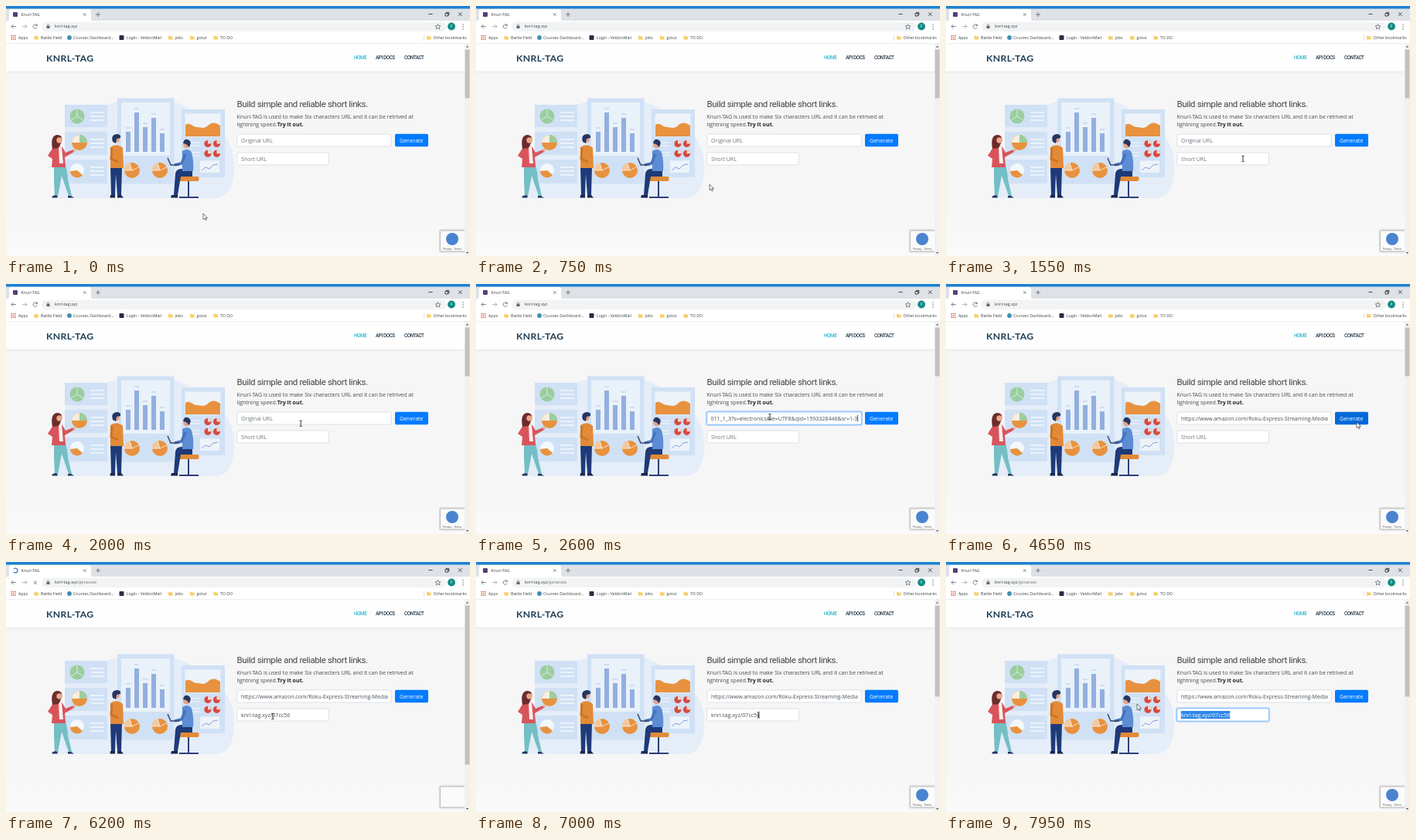
Animation, 600 px wide and 324 px high, one loop 8000 ms. Source, as an HTML page:

```html
<!DOCTYPE html>
<html lang="en">
<head>
<meta charset="utf-8">
<title>Link shortener demo</title>
<style>
  html, body { margin: 0; width: 100%; height: 100%; overflow: hidden; background: #f6f6f7; }
  svg { display: block; width: 100%; height: 100%; }
  text { font: 7.07px "Open Sans", "Noto Sans", sans-serif; fill: #4a4a4a; white-space: pre; }
  .ui text { font-size: 5.25px; fill: #3c4043; }
  .nav text { font: 500 6.3px Roboto, sans-serif; letter-spacing: -.4px; fill: #22384a; }
  .line { fill: none; stroke: #5f6368; stroke-width: .8; }
  .field { fill: #fff; stroke: #ced4da; stroke-width: .7; }
  .ring { fill: none; stroke: #007bff; stroke-opacity: .3; stroke-width: 2; }
  .hint { fill: #6c757d; }
  .value { fill: #495057; }
</style>
</head>
<body>
<svg viewBox="0 0 600 324" preserveAspectRatio="none">
  <defs>
    <linearGradient id="fade" x1="0" y1="0" x2="0" y2="1">
      <stop offset=".8" stop-color="#f6f6f7"/><stop offset="1" stop-color="#fafafa"/>
    </linearGradient>
    <filter id="soft" x="-20%" y="-20%" width="140%" height="140%"><feGaussianBlur stdDeviation="1.1"/></filter>
    <clipPath id="inner"><rect x="303.5" y="167" width="190.5" height="14"/></clipPath>
    <clipPath id="marked"><rect id="markedBox" y="193" height="10.5"/></clipPath>
    <path id="folder" d="M0-2.3h2l.7.8H5.6V2.4H0z" fill="#f6d066"/>
    <path id="rows" d="M0 0h18M0 5h18M0 10h18" stroke="#f3f8fc" stroke-width="1.6"/>
    <g id="pie"><circle r="10" fill="#e8923f"/><path d="M0 0L-10 0A10 10 0 0 1-3-9.5z" fill="#f6c796"/><path d="M0 0L9-4.4M0 0L-10 0M0 0L-3-9.5" stroke="#f3f8fc" stroke-width=".8"/></g>
    <g id="dot"><circle r="4.6" fill="#d9483f"/><path d="M0 0V-4.6A4.6 4.6 0 0 1 4.6 0z" fill="#f6d9cd"/></g>
  </defs>

  <!-- page -->
  <rect y="49" width="600" height="275" fill="url(#fade)"/>
  <rect y="50" width="593" height="36" fill="#000" opacity=".06" filter="url(#soft)"/>
  <rect y="48" width="593" height="36.700" fill="#fefefe"/>
  <text x="52" y="71.800" style="font:700 12.2px Lato,sans-serif;letter-spacing:.4px;fill:#1c3d54">KNRL-TAG</text>
  <g class="nav">
    <text x="450" y="69" style="fill:#2bb5cc">HOME</text>
    <text x="478" y="69">API DOCS</text>
    <text x="515" y="69">CONTACT</text>
  </g>

  <!-- illustration -->
  <path d="M66 249C58 228 66 205 76 196V146Q104 134 144 124C190 116 225 122 240 135C262 150 294 165 295 204C296 230 289 249 270 249z" fill="#e4edf8"/>
  <g fill="#d0e1f5">
    <rect x="76" y="128" width="55" height="29"/><rect x="76" y="163" width="55" height="30"/><rect x="76" y="199" width="55" height="31"/>
    <rect x="144" y="119.500" width="73.500" height="111"/><rect x="227" y="134" width="56" height="88"/>
  </g>
  <use href="#rows" x="109" y="138"/><use href="#rows" x="109" y="173"/><use href="#rows" x="109" y="209"/>
  <circle cx="92" cy="143" r="9.500" fill="#9bcda0"/><path d="M92 143V133.500M92 143L100 148M92 143L84 148" stroke="#e4f2e6" stroke-width=".8"/>
  <circle cx="95" cy="177" r="10" fill="#e8923f"/><path d="M95 177V167A10 10 0 0 1 105 177z" fill="#9bcda0"/><path d="M95 177H85A10 10 0 0 1 95 167z" fill="#f8eedd"/>
  <circle cx="92" cy="213" r="9" fill="#f3f8fc"/><path d="M92 213L83 214A9 9 0 0 0 99 219z" fill="#e8923f"/>
  <rect x="149" y="125" width="63" height="69" fill="#e9f1f9"/>
  <g id="bars"></g>
  <use href="#pie" x="163" y="213"/><use href="#pie" x="199" y="213"/>
  <rect x="231.500" y="139.500" width="46" height="30" fill="#edf3f9"/>
  <path d="M232 169V154C238 150 241 157 247 157S255 160 261 155S271 151 277 155V169z" fill="#e8923f"/>
  <use href="#dot" x="261" y="178.500"/><use href="#dot" x="272.500" y="178.500"/><use href="#dot" x="261" y="191.300"/><use href="#dot" x="272.500" y="191.300"/>
  <path d="M233 177h18M233 181h18M233 190h18M233 194h18" stroke="#f3f8fc"/>
  <rect x="251" y="200.500" width="25" height="15.500" fill="#edf3f9"/>
  <path d="M253 213l5-4 5 2 5-5 6-1" fill="none" stroke="#7f9fdc"/>

  <!-- woman -->
  <path d="M62 203h14q4 14 4 22l5 21h-4l-9-26-5 27h-4l-1-22z" fill="#74bfc6"/>
  <path d="M59.500 247q3-3 7-1v2.500h-7zM80 246h4l4 2.500h-8z" fill="#223462"/>
  <path d="M61 183q7-4 12 0l4 7 10-4 1 3-12 7 1 13H59l1-11-6-4z" fill="#d9545a"/>
  <path d="M68 182h4l2 22h-5z" fill="#f6efef"/>
  <path d="M60 185q-3-17 6-18 8 0 6 9l-4 8z" fill="#6d2c2c"/>
  <circle cx="69" cy="174" r="3.700" fill="#eba988"/><circle cx="88" cy="187" r="1.800" fill="#eba988"/>
  <!-- standing man -->
  <path d="M135 208h15l-1 37h-5l-2-27-1 27h-5z" fill="#1f3a78"/>
  <path d="M135 245h6v3.500h-6.500zM144 245h5l3 3.500h-8z" fill="#1a2850"/>
  <path d="M135 183q8-6 16 1l1 26h-17z" fill="#e28a36"/>
  <path d="M137 184l-1 14 9 4" fill="none" stroke="#cb7426" stroke-width="3"/>
  <circle cx="142.500" cy="173" r="4.400" fill="#e5a182"/><path d="M138 176q-3-9 5-10 6 0 5 5l-5 1-1 6z" fill="#263561"/>
  <!-- seated man -->
  <path d="M236 226v21M224 248h25" stroke="#2e3f78" stroke-width="2"/>
  <rect x="223.500" y="221" width="26" height="6" rx="2" fill="#e28a36"/>
  <path d="M241 211v10h-15l-4 24h-5l2-28q1-6 8-6z" fill="#1f3a78"/>
  <path d="M214 245h8v3.500h-9z" fill="#1a2850"/>
  <path d="M228 188q8-5 12 2 3 10 2 24h-14z" fill="#5c8cd3"/>
  <path d="M232 192l-5 12-9 2" fill="none" stroke="#4474be" stroke-width="3.500"/>
  <path d="M209 197l4 9h11" fill="none" stroke="#34456f" stroke-width="1.500"/>
  <circle cx="233.500" cy="180" r="4.300" fill="#e5a182"/><path d="M229 178q1-6 6-5 6 2 2 10l-4-4z" fill="#263561"/>

  <!-- form -->
  <text x="298.500" y="131" style="font:11.5px Roboto,sans-serif;letter-spacing:-.38px;fill:#444">Build simple and reliable short links.</text>
  <text x="298.500" y="145.600">Knurl-TAG is used to make Six characters URL and it can be retrived at</text>
  <text x="298.500" y="156.200">lightning speed.<tspan font-weight="700" fill="#222">Try it out.</tspan></text>
  <rect class="ring" id="ring1" x="298" y="165.200" width="201" height="17.600" rx="2.500"/>
  <rect class="field" id="field1" x="298.800" y="166" width="199.500" height="16" rx="1.800"/>
  <g clip-path="url(#inner)"><text id="long" y="176.500"></text></g>
  <path id="caret" stroke="#222" stroke-width=".7"/>
  <rect id="button" x="503" y="165.700" width="43" height="16.600" rx="1.800"/>
  <text x="509" y="176.500" style="fill:#fff">Generate</text>
  <rect class="ring" id="ring2" x="298" y="189.200" width="120" height="17.600" rx="2.500"/>
  <rect class="field" id="field2" x="298.800" y="190" width="118.500" height="16" rx="1.800"/>
  <text id="short" x="304" y="200.700"></text>
  <g id="selection" clip-path="url(#marked)">
    <rect x="303.500" y="193" width="64" height="10.500" fill="#2f86e8"/>
    <text x="304" y="200.700" style="fill:#fff">knrl-tag.xyz/07cc56</text>
  </g>

  <!-- badge and scrollbar -->
  <g id="badge">
    <rect x="561" y="290.500" width="33" height="28" fill="#777" opacity=".65" filter="url(#soft)"/>
    <rect x="562" y="291.500" width="31" height="26" fill="#fbfbfb"/>
    <g id="badgeMark"><circle cx="577" cy="302" r="8" fill="#4a83d0"/><text x="577" y="316" text-anchor="middle" style="font-size:3.5px">Privacy - Terms</text></g>
  </g>
  <rect x="593" y="49" width="7" height="275" fill="#f1f1f1"/>
  <path d="M594.800 53.500l1.700-2 1.700 2zM594.800 319l1.700 2 1.700-2z" fill="#555"/>
  <rect id="thumb" x="593.500" y="56.500" width="6" fill="#c1c1c1"/>

  <!-- browser -->
  <g class="ui">
    <rect width="600" height="20" fill="#dee1e6"/><rect width="600" height="3.500" fill="#1b82d2"/>
    <path d="M1 19.500q3 0 3-3V7q0-3 3-3H107q3 0 3 3v9.500q0 3 3 3z" fill="#fff"/>
    <rect y="19" width="600" height="29.500" fill="#fff"/><path d="M0 48.700H600" stroke="#e3e4e6" stroke-width=".7"/>
    <rect id="icon" x="9" y="8" width="6" height="6" rx="1" fill="#563d7c"/>
    <path id="spinner" d="M0-3A3 3 0 1 1-3 0" fill="none" stroke="#2b62b5" stroke-width="1.200"/>
    <text x="19.500" y="12.900">Knurl-TAG</text>
    <path class="line" d="M100 9.300l3.400 3.400m0-3.400l-3.400 3.400M116 11h6m-3-3v6"/>
    <path class="line" d="M546.500 10.500h5M568 9.500h3.500V13H568zM569.300 9.500V8.300h3.500v3.500h-1.300M585 8.300l4.500 4.500m0-4.500l-4.500 4.500" style="stroke:#222"/>
    <path class="line" d="M13 26.500H7m2.500-2.500L7 26.500 9.500 29"/><path class="line" d="M21 26.500h6m-2.500-2.500 2.500 2.500-2.500 2.500" stroke-opacity=".6"/>
    <path class="line" id="reload" d="M40 25A2.700 2.700 0 1 0 40.300 27.500M40.300 23.500V25.500H38.200"/>
    <path class="line" id="stop" d="M35.700 24.500l4.300 4.300m0-4.300l-4.300 4.300"/>
    <rect x="46" y="20.500" width="523" height="12.500" rx="6.200" fill="#f1f3f4"/>
    <path d="M52.500 26h4v3h-4z" fill="#5f6368"/><path class="line" d="M53.300 26v-1.200q1.200-1.800 2.400 0V26"/>
    <text x="63" y="28.400" style="font-size:5.5px">knrl-tag.xyz<tspan id="path" style="fill:#777">/generate</tspan></text>
    <path class="line" d="M558.500 23.500l1 2.200 2.400.2-1.800 1.600.6 2.400-2.200-1.300-2.200 1.300.6-2.400-1.800-1.600 2.400-.2z" stroke-width=".6"/>
    <circle cx="576" cy="26.500" r="4.900" fill="#108b83"/><text x="576" y="28.300" text-anchor="middle" style="fill:#fff">F</text>
    <path d="M591 23.200v7.400" stroke="#5f6368" stroke-width="1.200" stroke-dasharray="1.200 1.800"/>
    <path d="M6.500 38.500h6M6.500 40.900h6M6.500 43.300h6" stroke="#d2604b" stroke-width="1.400" stroke-dasharray="1.400 .9"/>
    <circle cx="82" cy="41" r="2.900" fill="#3f8fb5"/><rect x="146.500" y="38" width="6" height="6" rx="1" fill="#2c2b45"/>
    <path d="M540.500 37.500v7" stroke="#d5d7da" stroke-width=".7"/>
    <g id="bookmarks"></g>
  </g>

  <g id="cursor" fill="#fff" stroke="#222" stroke-width=".6">
    <path id="arrow" d="M0 0V7.700L1.800 6 3 8.700 4.300 8.100 3.100 5.600H5.500z"/>
    <path id="beam" d="M-1.700-3.600H-.4L0-3.200.4-3.600H1.700M0-3.200V3.200M-1.700 3.600H-.4L0 3.200.4 3.600H1.700" fill="none" stroke-width=".9"/>
    <path id="hand" d="M-.8.800Q0-.6.800.8V3.300L4 4.100Q4.800 4.500 4.600 5.500L4 9H-.7L-3.200 5.400Q-2.800 4.100-.8 5.500z"/>
  </g>
</svg>

<script>
const LOOP = 8000, STEP = 50;
const PASTE = 2500, CLICK = 3500, LOADING = 4700, SWAP = 5600, LOADED = 6900, DRAG = 7200;
const LINK_START = "https://www.amazon.com/Roku-Express-Streaming-Media";
const LINK_END = "011_1_3?s=electronics&ie=UTF8&qid=1593328446&sr=1-3";

// time, x, y, shape held until the next key
const PATH = [
  [0, 255, 269, "arrow"], [700, 300, 232, "arrow"], [1150, 370, 203, "beam"],
  [1500, 384, 198, "beam"], [1750, 384, 198, "beam"], [2150, 380, 173, "beam"],
  [2600, 380, 172, "beam"], [3000, 485, 174, "arrow"], [3100, 505, 176, "hand"],
  [3400, 534, 180, "hand"], [3750, 534, 180, "arrow"], [4100, 531, 179, "arrow"],
  [4650, 531, 179, "arrow"], [5000, 508, 162, "arrow"], [5250, 455, 168, "beam"],
  [5550, 400, 182, "arrow"], [5800, 360, 195, "beam"], [6150, 345, 200, "beam"],
  [6750, 345, 200, "beam"], [7100, 370, 198, "beam"], [7200, 370, 198, "beam"],
  [7550, 247, 184, "arrow"], [8000, 247, 184, "arrow"]
];

const $ = id => document.getElementById(id);
const set = (id, attrs) => Object.entries(attrs).forEach(([k, v]) => $(id).setAttribute(k, v));
const show = (id, on) => set(id, { visibility: on ? "inherit" : "hidden" });
const between = (t, a, b) => t >= a && t < b;
const ramp = (t, start) => Math.min(1, Math.max(0, (t - start) / 150));

$("bars").innerHTML = [26, 51, 32, 44, 24].map((h, i) => {
  const x = 155 + i * 11;
  return `<rect x="${x}" y="${189 - h}" width="6" height="${h}" fill="#93afdf"/>
    <path d="M${x} ${184 - h}h6" stroke="#b6c9ea"/>`;
}).join("");

$("bookmarks").innerHTML = [
  [16, "Apps"], [45, "Battle Field", 1], [87, "Courses Dashboard..."], [156, "Login - VeldonMail"],
  [218.5, "jobs", 1], [246.5, "gotut", 1], [277, "TO DO", 1], [552.5, "Other bookmarks", 1]
].map(([x, label, folder]) =>
  `<text x="${x}" y="42.900">${label}</text>` + (folder ? `<use href="#folder" x="${x - 8.5}" y="41"/>` : "")
).join("");

function pointer(t) {
  const i = PATH.findIndex(key => key[0] > t) - 1;
  const [t0, x0, y0, shape] = PATH[i], [t1, x1, y1] = PATH[i + 1];
  const k = (1 - Math.cos(Math.PI * (t - t0) / (t1 - t0))) / 2;
  return { x: x0 + (x1 - x0) * k, y: y0 + (y1 - y0) * k, shape };
}

function focus(n, amount) {
  set("ring" + n, { opacity: amount });
  $("field" + n).style.stroke = amount > .3 ? "#80bdff" : "#ced4da";
}

function write(id, text, kind) {
  if ($(id).textContent !== text) $(id).textContent = text;
  set(id, { class: kind });
}

function render(t) {
  const swapped = t >= SWAP, pasted = t >= PASTE;
  const { x, y, shape } = pointer(t);
  set("cursor", { transform: `translate(${x} ${y})` });
  ["arrow", "beam", "hand"].forEach(id => show(id, id === shape));

  const scrolled = between(t, PASTE, CLICK);
  write("long", !pasted ? "Original URL" : scrolled ? LINK_END : LINK_START, pasted ? "value" : "hint");
  set("long", { x: scrolled ? 493.3 : 304, "text-anchor": scrolled ? "end" : "start" });
  focus(1, ramp(t, 2150) - ramp(t, CLICK + 50));
  set("caret", { d: `M${pasted ? 493.6 : 304} 169.500v9` });
  show("caret", between(t, 2150, CLICK) && (t - (pasted ? PASTE : 2150)) % 1000 < 500);
  set("button", { fill: between(t, 3100, 4800) ? "#0069d9" : "#007bff" });

  write("short", swapped ? "knrl-tag.xyz/07cc56" : "Short URL", swapped ? "value" : "hint");
  focus(2, ramp(t, DRAG));
  const left = Math.min(367.5, Math.max(303.5, x));
  set("markedBox", { x: left, width: 367.5 - left });
  show("selection", t >= DRAG);

  const busy = between(t, LOADING, LOADED);
  show("icon", !busy);
  show("spinner", busy);
  set("spinner", { transform: `translate(12 11) rotate(${(swapped ? 1 : -1) * t * .4})` });
  show("stop", busy);
  show("reload", !busy);
  show("path", swapped);
  show("badge", !between(t, SWAP, 5900));
  show("badgeMark", !between(t, SWAP, 6500));
  set("thumb", { height: !swapped ? 63 : t < 6500 ? 206 : 118 });
}

function tick() {
  render(Math.floor(performance.now() % LOOP / STEP) * STEP);
  requestAnimationFrame(tick);
}
tick();
</script>
</body>
</html>
```
